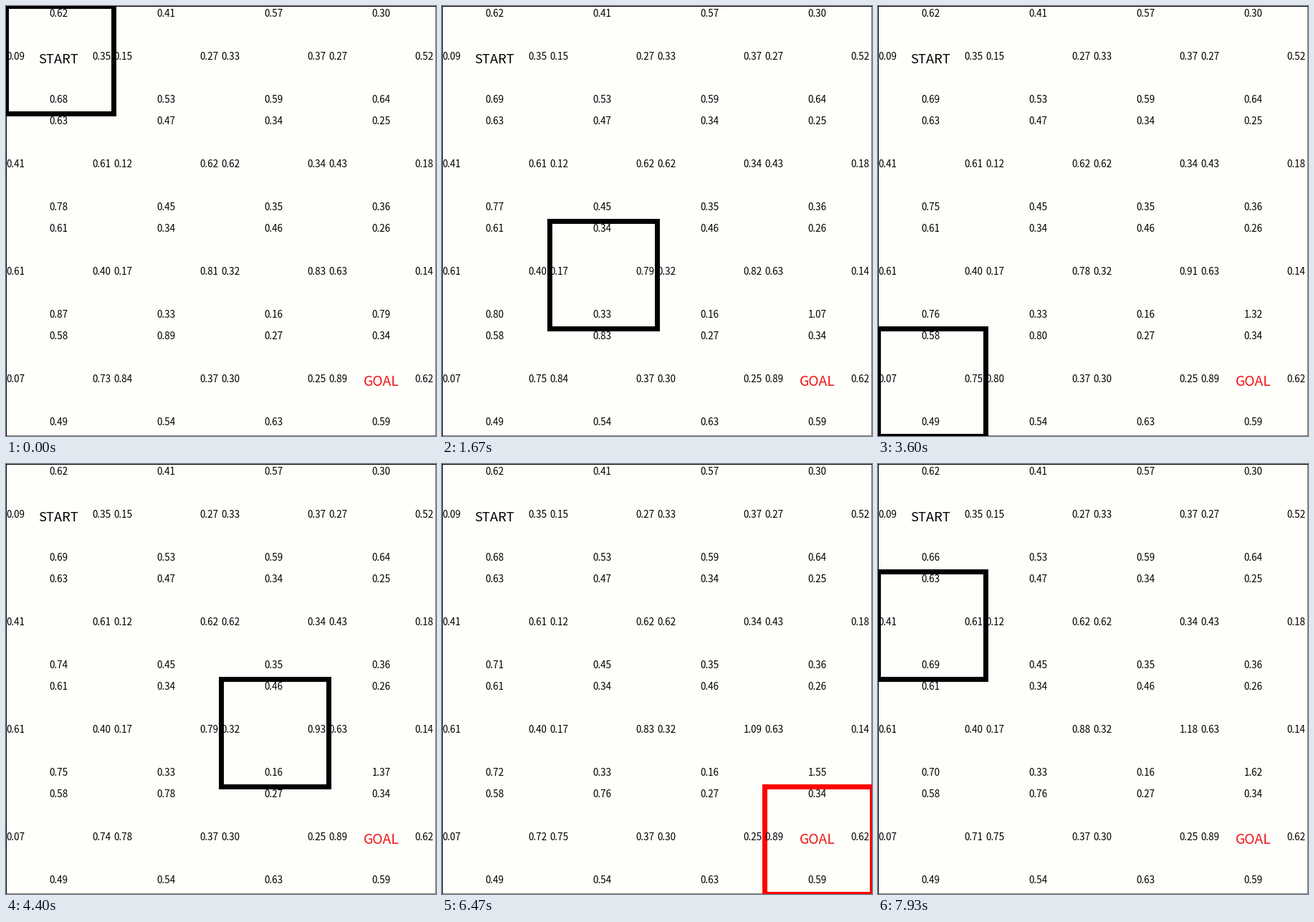
Animation, 600 px wide and 600 px high, one loop 8 s. Source, as a matplotlib script:

```python
import numpy as np
import matplotlib.pyplot as plt
from matplotlib.animation import FuncAnimation
from matplotlib.patches import Rectangle

SIZE, CELL, N = 600, 150, 4
FRAMES, LOOP_MS = 150, 8000
STEPS_PER_SEC, DELAY = 20, 2 / 3
ALPHA, GAMMA = 0.1, 0.9
START, GOAL = (0, 0), (3, 3)
FONT = "Noto Sans CJK JP"
PX = 0.72  # points per pixel at 100 dpi

UP, RIGHT, DOWN, LEFT = range(4)
MOVES = [(-1, 0), (0, 1), (1, 0), (0, -1)]


def first_table():
    """Random values, with the strong actions along the known route set."""
    q = np.random.default_rng(4).uniform(0.04, 0.65, (N, N, 4))
    q[0, 0, DOWN] = 0.681
    q[1, 0, DOWN] = 0.78
    q[2, 0, DOWN] = 0.872
    q[3, 0, RIGHT] = 0.734
    q[3, 1, UP] = 0.894
    q[3, 1, LEFT] = 0.8355
    q[2, 1, RIGHT] = 0.81
    q[2, 2, RIGHT] = 0.829
    q[2, 3, DOWN] = 0.794
    q[3, 3, LEFT] = 0.892
    return q


def learn(steps):
    """Greedy Q-learning: the agent's cell and the table at each step."""
    q, cell, history = first_table(), START, []
    for _ in range(steps):
        history.append((cell, q.copy()))
        if cell == GOAL:
            cell = START
            continue
        act = int(np.argmax(q[cell]))
        nxt = tuple(min(max(p + d, 0), N - 1) for p, d in zip(cell, MOVES[act]))
        target = float(nxt == GOAL) + GAMMA * q[nxt].max()
        q[cell][act] += ALPHA * (target - q[cell][act])
        cell = nxt
    return history


def step_at(frame):
    seconds = frame * LOOP_MS / FRAMES / 1000
    return max(0, int(STEPS_PER_SEC * seconds - DELAY))


history = learn(step_at(FRAMES) + 1)

fig = plt.figure(figsize=(6, 6), dpi=100, facecolor="#fefefa")
ax = fig.add_axes([0, 0, 1, 1])
ax.set_xlim(0, SIZE)
ax.set_ylim(SIZE, 0)
ax.axis("off")


def write(x, y, text, px, color="black"):
    return ax.text(x, y, text, fontsize=px * PX, family=FONT, color=color,
                   ha="left", va="baseline", zorder=3)


def bar(x, y, w, h, color):
    ax.add_patch(Rectangle((x, y), w, h, facecolor=color, linewidth=0, zorder=1))


for x, y, color in [(SIZE - 1, SIZE - 1, "#808078"), (0, 0, "black")]:
    bar(x, 0, 1, SIZE, color)
    bar(0, y, SIZE, 1, color)

write(45.5, 80, "START", 18.3)
write(499.3, 530, "GOAL", 19.3, "#f01414")

# each value sits on the side of the cell its action leads to
labels = {}
for r, c, a in np.ndindex(N, N, 4):
    dy, dx = MOVES[a]
    labels[r, c, a] = write(c * CELL + 60.4 + 60 * dx, r * CELL + 75 + 60 * dy, "", 13.5)

# unsnapped, so the 7 px stroke falls on whole pixels
agent = Rectangle((0, 0), CELL, CELL, fill=False, linewidth=7 * PX,
                  joinstyle="miter", snap=False, zorder=2)
ax.add_patch(agent)


def draw(frame):
    cell, q = history[step_at(frame)]
    agent.set_xy((cell[1] * CELL + 0.5, cell[0] * CELL + 0.5))
    agent.set_edgecolor("red" if cell == GOAL else "black")
    for key, label in labels.items():
        label.set_text(f"{q[key]:.2f}")
    return [agent, *labels.values()]


anim = FuncAnimation(fig, draw, frames=FRAMES, interval=LOOP_MS / FRAMES,
                     repeat=True, repeat_delay=0, blit=False)
plt.show()
```
